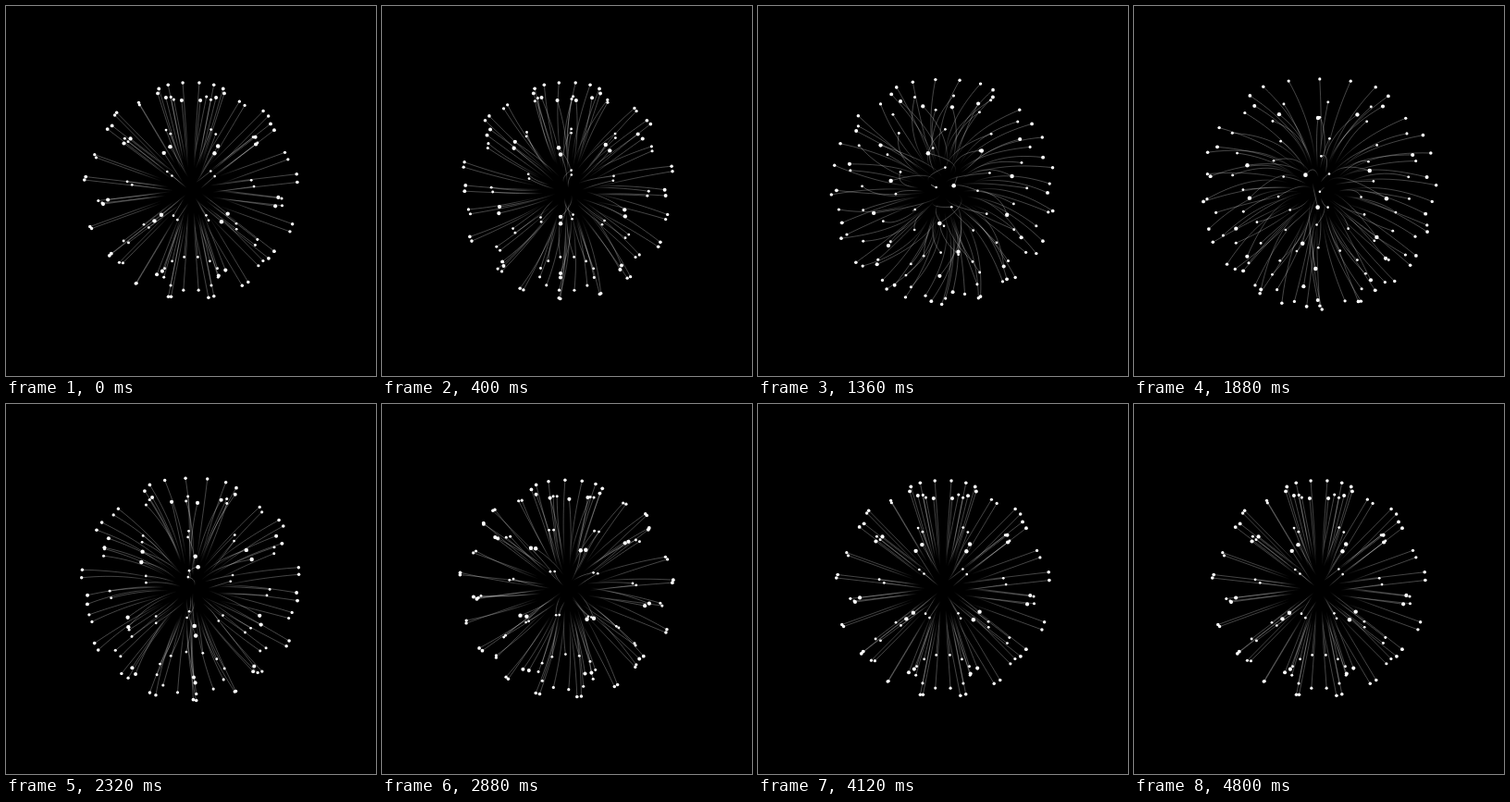
Recreate the animation shown at these times as an HTML page with a canvas. Size 400x400 px, loop 4840 ms.

```html
<!DOCTYPE html>
<html>
<head>
<meta charset="utf-8">
<style>
  html, body { margin: 0; width: 100%; height: 100%; overflow: hidden; background: #000; }
  canvas { display: block; width: 400px; height: 400px; }
</style>
</head>
<body>
<canvas id="stage" width="400" height="400"></canvas>
<script>
const ctx = document.getElementById('stage').getContext('2d');
const { sin, cos, atan2, min, max, floor, hypot, PI } = Math;
const rad = PI / 180;
const LOOP = 4840, STEP = 40, SPIN = 3000;
const CORE = 36.6, LENGTH = 79, CAMERA = 500, TILT = 27.3 * rad;
const COLS = 12, ROWS = 6;
const FLING = 27, SAG = 22, STRETCH = .09;

// [ms, lag behind the spin, bend 0..1, pair spread sideways, pair spread upwards]
const poses = [
  [0, 0, 0, 0, 0], [300, 8, 0, 2, 0], [720, 18, .05, 6, 0], [1100, 31, .25, 9, 6],
  [1360, 34, .5, 10, 10], [1720, 6, .93, 9, 10], [1880, -8, 1, 8, 9],
  [2280, -8, .4, 4, 2], [2560, 1, .15, 1, -2], [2880, 6, .05, 0, -3],
  [3200, 1, 0, 0, -1], [3520, -1, 0, 0, 0], [3900, 0, 0, 0, 0], [LOOP, 0, 0, 0, 0]
];

function poseAt(t, k) {
  let i = 0;
  while (i < poses.length - 2 && t >= poses[i + 1][0]) i++;
  const slope = j => {
    const a = poses[max(j - 1, 0)], b = poses[min(j + 1, poses.length - 1)];
    return j === 0 ? 0 : (b[k] - a[k]) / (b[0] - a[0]);
  };
  const a = poses[i], b = poses[i + 1], w = b[0] - a[0], s = (t - a[0]) / w;
  const h = s * s * (3 - 2 * s);
  return a[k] + (b[k] - a[k]) * h
    + w * s * (1 - s) * ((1 - s) * slope(i) - s * slope(i + 1));
}

const polar = (r, theta, lon) =>
  [r * sin(theta) * sin(lon), r * cos(theta), r * sin(theta) * cos(lon)];

const add = (a, b, k = 1) => a.map((v, i) => v + b[i] * k);

function spin([x, y, z], a) {
  return [x * cos(a) + z * sin(a), y, z * cos(a) - x * sin(a)];
}

function project([x, y, z]) {
  const depth = y * sin(TILT) + z * cos(TILT);
  const s = CAMERA / (CAMERA - depth);
  return [200 + x * s, 200 - (y * cos(TILT) - z * sin(TILT)) * s, s];
}

// One hair for each triangle of a coarse globe, along the face normal.
const hairs = [];
for (let row = 0; row < ROWS; row++) {
  const t0 = row * PI / ROWS, t1 = (row + 1) * PI / ROWS;
  const theta = atan2(cos(t0) - cos(t1), (sin(t1) - sin(t0)) * cos(PI / COLS));
  for (let col = 0; col < COLS; col++) {
    const l0 = col * 2 * PI / COLS, l1 = (col + 1) * 2 * PI / COLS;
    const nw = polar(CORE, t0, l0), ne = polar(CORE, t0, l1);
    const sw = polar(CORE, t1, l0), se = polar(CORE, t1, l1);
    const normal = polar(1, theta, (l0 + l1) / 2);
    const grow = (third, side) => {
      const root = add(add(nw, se), third).map(v => v / 3);
      hairs.push({ root, end: add(root, normal, LENGTH), side });
    };
    if (row < ROWS - 1) grow(sw, row ? -1 : 0);
    if (row > 0) grow(ne, row < ROWS - 1 ? 1 : 0);
  }
}

// Offsets are lengths along the sphere, so hairs near the poles swing further round.
function tipOf({ end, side }, lag, bend, spread, rise) {
  const r = hypot(...end), rest = Math.acos(end[1] / r);
  const drop = bend * (FLING * cos(rest) + SAG * sin(rest)) - side * rise;
  const theta = rest + drop / r;
  const lon = atan2(end[0], end[2]) - (lag + side * spread) / (r * sin(theta));
  return polar(r * (1 + STRETCH * bend), theta, lon);
}

function draw(t) {
  const s = min(t / SPIN, 1), turn = 2 * PI * s * s * (3 - 2 * s);
  const pose = [1, 2, 3, 4].map(k => poseAt(t, k));
  ctx.fillStyle = '#000';
  ctx.fillRect(0, 0, 400, 400);
  ctx.lineWidth = .62;
  const dots = [];
  for (const hair of hairs) {
    const { root, end } = hair;
    const tip = tipOf(hair, ...pose);
    const along = add(end, root, -1), pull = add(tip, end, -1);
    const at = u => project(spin(add(add(root, along, u), pull, u * u), turn));
    const a = at(0), b = at(1);
    const shade = ctx.createLinearGradient(a[0], a[1], b[0], b[1]);
    shade.addColorStop(0, 'rgba(255,255,255,0)');
    shade.addColorStop(.35, 'rgba(255,255,255,.4)');
    shade.addColorStop(1, 'rgba(255,255,255,.46)');
    ctx.strokeStyle = shade;
    ctx.beginPath();
    ctx.moveTo(a[0], a[1]);
    for (let i = 1; i <= 14; i++) {
      const p = at(i / 14);
      ctx.lineTo(p[0], p[1]);
    }
    ctx.stroke();
    dots.push(b);
  }
  ctx.fillStyle = '#fff';
  for (const [x, y, k] of dots) {
    ctx.beginPath();
    ctx.arc(x, y, 1.65 * k ** 1.2, 0, 2 * PI);
    ctx.fill();
  }
}

const start = performance.now();
function tick() {
  const t = (performance.now() - start) % LOOP;
  draw(floor(t / STEP) * STEP);
  requestAnimationFrame(tick);
}
draw(0);
requestAnimationFrame(tick);
</script>
</body>
</html>
```
